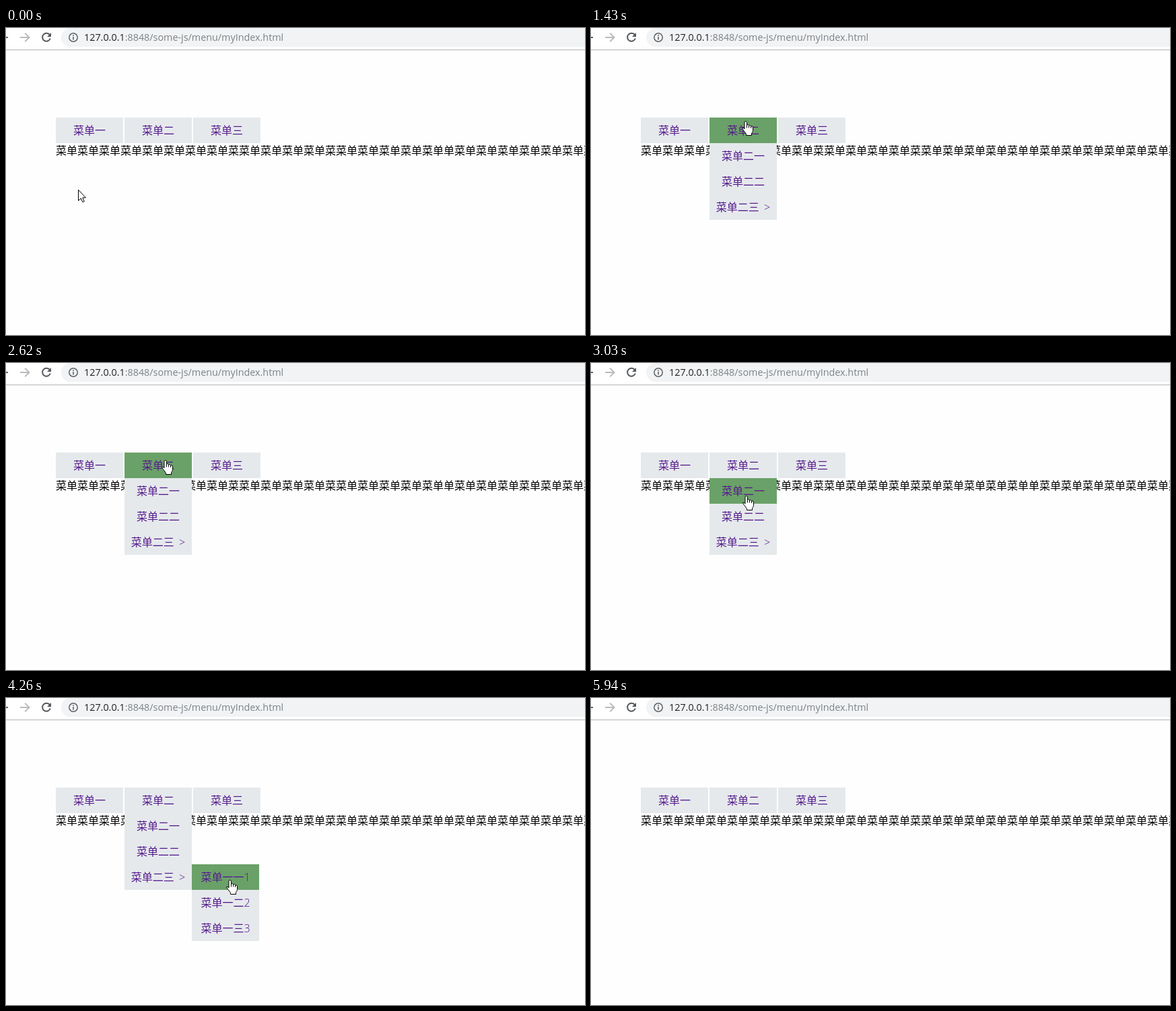
Write an HTML page that moves like this. It is 860 by 456 pixels and loops after 6480 ms.

```html
<!DOCTYPE html>
<html lang="zh-CN">
<head>
<meta charset="utf-8">
<title>menu</title>
<style>
  html, body { margin: 0; width: 100%; height: 100%; overflow: hidden; background: #fefefe; }
  svg { display: block; }
  text { font: 350 16px "Open Sans", "Noto Sans CJK SC", "Noto Sans CJK", sans-serif; white-space: pre; }
  .url { font-size: 14.35px; font-weight: 400; fill: #7d8287; }
  .url tspan { fill: #202124; }
  .item rect { fill: #e5e9ec; }
  .item.on rect { fill: #6aa168; }
  .item text { fill: #551a8b; text-anchor: middle; }
  .cursor { fill: #fff; stroke: #000; stroke-linejoin: round; }
</style>
</head>
<body>
<svg width="860" height="456" viewBox="0 0 860 456">
  <rect width="860" height="32" fill="#fff"/>
  <path d="M0 32.5H860" stroke="#b3b4b5"/>
  <rect x="82" width="820" height="28" rx="14" fill="#f1f3f4"/>
  <g fill="none" stroke-width="2">
    <path d="M-8 14H3" stroke="#5f6368"/>
    <path d="M21 14H34M28.2 7.7L34.5 14L28.2 20.3" stroke="#b9bbbe"/>
    <path d="M65 10.2A6 6 0 1 0 65.8 15.5" stroke="#55595e"/>
    <path d="M67 7V13H61Z" fill="#55595e" stroke="none"/>
    <circle cx="100" cy="14" r="6.2" stroke="#5f6368" stroke-width="1.5"/>
    <path d="M100 13V17.5M100 10.3V11.9" stroke="#5f6368" stroke-width="1.6"/>
  </g>
  <text class="url" x="116" y="19"><tspan>127.0.0.1</tspan>:8848/some-js/menu/myIndex.html</text>
  <text id="line" x="74" y="188"></text>
  <g id="menu"></g>
  <g id="arrow" class="cursor">
    <path d="M.5 .5V16.5L4.3 13L6.8 18.5L9.3 17.5L6.8 12H11.5Z"/>
  </g>
  <g id="hand" class="cursor">
    <path d="M5.5 .5Q7.5 .5 7.5 2.5V5.8Q10.2 5 10.5 6.8Q13 6 13.5 7.8Q16.5 7.2 16.5 10V14.5Q16.3 16.5 14.5 18.5V21.5H6.5V19.5Q5 17 3 14.7Q.4 11.5 .6 10.6Q1.7 9 4 12V2.5Q4 .5 5.5 .5Z"/>
    <path d="M7.5 5.8V10.5M10.5 6.8V10.5M13.5 7.8V11" fill="none"/>
  </g>
</svg>
<script>
const LOOP = 6480, W = 100, H = 38;
const NUM = ['', '一', '二', '三'];
const $ = id => document.getElementById(id);
const pairs = n => '菜单'.repeat(n);

$('line').textContent = pairs(8) + '菜' + pairs(4) + '菜' + pairs(5) + '单' + pairs(7);

// Each key is the path of an item: '2' is the bar, '23' its dropdown, '231' the submenu.
const items = {};
function addItem(key, x, y, label) {
  const g = document.createElementNS('http://www.w3.org/2000/svg', 'g');
  g.innerHTML = `<rect x="${x}" y="${y}" width="${W}" height="${H}"/>` +
    `<text x="${x + W / 2}" y="${y + 25}">菜单${label}</text>`;
  $('menu').append(g);
  items[key] = g;
}
for (let i = 1; i <= 3; i++) {
  const x = 74 + (i - 1) * 102;
  addItem(`${i}`, x, 133, NUM[i]);
  for (let j = 1; j <= 3; j++) {
    const more = i === 2 && j === 3 ? '<tspan dx="3"> &gt;</tspan>' : '';
    addItem(`${i}${j}`, x, 133 + j * H, NUM[i] + NUM[j] + more);
  }
}
for (let k = 1; k <= 3; k++) addItem(`23${k}`, 276, 247 + (k - 1) * H, `一${NUM[k]}${k}`);

// time, x, y, hovered item, pointer
const A = 'arrow', P = 'hand';
const steps = [
  [0, 107, 240, '', A], [310, 109, 236, '', A], [460, 111, 217, '', A], [580, 113, 192, '', A],
  [730, 107, 169, '', P], [880, 107, 162, '1', P], [1010, 107, 158, '1', P],
  [1150, 134, 150, '1', P], [1280, 174, 144, '1', P],
  [1430, 224, 138, '2', P], [1550, 242, 139, '2', P], [1700, 268, 142, '2', P],
  [1830, 298, 145, '3', P], [1950, 306, 145, '3', P], [2090, 282, 143, '3', P],
  [2220, 240, 141, '2', P], [2370, 231, 142, '2', P], [2620, 231, 144, '2', P],
  [2740, 229, 155, '2', P], [2880, 227, 176, '2', P],
  [3030, 225, 197, '21', P], [3150, 222, 222, '22', P],
  [3300, 220, 244, '23', P], [3420, 219, 252, '23', P], [3570, 222, 254, '23', P],
  [3700, 229, 257, '23', P], [3840, 251, 257, '23', P],
  [3990, 289, 257, '231', P], [4140, 310, 262, '231', P], [4260, 327, 270, '231', P],
  [4410, 333, 288, '232', P], [4540, 341, 309, '232', P],
  [4690, 350, 325, '233', P], [4820, 358, 337, '233', P], [4970, 366, 345, '233', P],
  [5090, 405, 349, '', A], [5240, 451, 356, '', A], [5390, 640, 390, '', A],
  [5510, 844, 435, '', A], [5660, 850, 436, '', A], [5810, 856, 442, '', A],
  [5940, 0, 0, '', '']
];

const show = (el, on) => el.setAttribute('visibility', on ? 'visible' : 'hidden');

function draw(step) {
  const [, x, y, hover, pointer] = step;
  for (const key in items) {
    show(items[key], key.length === 1 || hover.startsWith(key.slice(0, -1)));
    items[key].setAttribute('class', key === hover ? 'item on' : 'item');
  }
  for (const id of [A, P]) {
    show($(id), id === pointer);
    $(id).setAttribute('transform', `translate(${x} ${y})`);
  }
}

const start = performance.now();
let last;
function tick() {
  const t = Math.max(0, performance.now() - start) % LOOP;
  const step = steps.findLast(s => s[0] <= t);
  if (step !== last) draw(last = step);
  requestAnimationFrame(tick);
}
tick();
</script>
</body>
</html>
```
